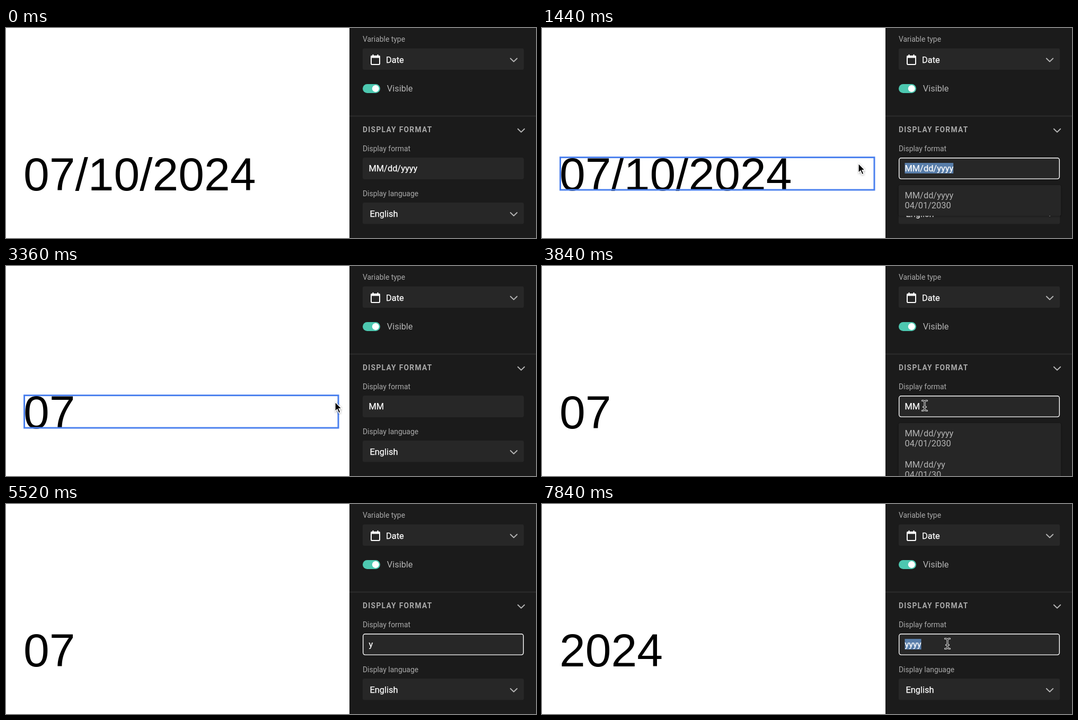
Write an HTML page that moves like this. It is 1000x397 px and loops after 8000 ms.

```html
<!DOCTYPE html>
<html lang="en">
<head>
<meta charset="utf-8">
<title>Date variable display format</title>
<style>
  html, body { margin: 0; width: 100%; height: 100%; overflow: hidden; background: #fff; }
  svg { display: block; width: 100vw; height: 100vh; }
  text { font: 16.4px Roboto, sans-serif; fill: #b4b4b4; white-space: pre; }
  .label { font-size: 13.9px; fill: #aaa; }
  .value { fill: #fff; stroke: #fff; stroke-width: .25; }
  .title { font-size: 13.8px; font-weight: 700; letter-spacing: 1.3px; fill: #a8a8a8; }
  .date { font: 87.6px "Liberation Sans", Arial, sans-serif; fill: #000; }
  .field { fill: #272727; }
  .chevron { fill: none; stroke: #b4b4b4; stroke-width: 1.9; stroke-linecap: round; stroke-linejoin: round; }
</style>
</head>
<body>
<svg viewBox="0 0 1000 397">
  <defs>
    <path id="chevron" class="chevron" d="M-6.2 -3 L0 3 L6.2 -3"/>
    <path id="bar" d="M-4.5 -9.5 Q-.5 -9.5 0 -7 Q.5 -9.5 4.5 -9.5 M0 -7 V7 M-4.5 9.5 Q-.5 9.5 0 7 Q.5 9.5 4.5 9.5 M-2.5 2.5 H2.5" fill="none" stroke-linecap="round"/>
    <filter id="shadow" x="-10%" y="-20%" width="120%" height="140%">
      <feDropShadow dx="0" dy="1" stdDeviation="2" flood-color="#000" flood-opacity=".4"/>
    </filter>
  </defs>

  <rect width="1000" height="397" fill="#fff"/>
  <text id="date" class="date" x="33" y="307.2"></text>
  <rect id="frame" x="34.5" y="244.6" width="592.5" height="61.4" fill="none" stroke="#4a80ee" stroke-width="3"/>

  <rect x="648" width="352" height="397" fill="#1b1b1b"/>
  <rect x="648" y="165.5" width="352" height="2" fill="#2d2d2d"/>

  <text class="label" x="673" y="26">Variable type</text>
  <rect class="field" x="673" y="38.5" width="304" height="40.5" rx="3"/>
  <g stroke="#fff" fill="none" stroke-width="2">
    <rect x="689" y="53" width="16" height="16" rx="1.8"/>
    <path d="M688.5 54.5 H705.5" stroke-width="4"/>
    <path d="M692.5 50 V54 M701.5 50 V54"/>
  </g>
  <text class="value" x="717" y="65.5">Date</text>
  <use href="#chevron" x="958" y="60.5"/>

  <rect x="673" y="106" width="33" height="17" rx="8.5" fill="#4dc8b0"/>
  <circle cx="697.3" cy="114.5" r="6.5" fill="#fff"/>
  <text x="718.8" y="120">Visible</text>

  <text class="title" x="673" y="197">DISPLAY FORMAT</text>
  <use href="#chevron" x="972" y="193.7"/>

  <text class="label" x="673" y="233">Display format</text>
  <rect class="field" x="673" y="245" width="304" height="41" rx="3.5"/>
  <rect id="focus" x="673.7" y="245.7" width="302.6" height="39.4" rx="4" fill="#272727" stroke="#fff" stroke-width="1.4"/>
  <rect id="selection" y="255" height="20" fill="#587da9"/>
  <text id="input" class="value" x="684.5" y="271"></text>

  <text class="label" x="673" y="318">Display language</text>
  <rect class="field" x="673" y="330" width="304" height="40.5" rx="3"/>
  <text class="value" x="686.5" y="357">English</text>
  <use href="#chevron" x="958" y="352"/>

  <g id="list">
    <rect id="popup" x="673" y="297" width="306" rx="3" fill="#272727" filter="url(#shadow)"/>
    <text x="684.5" y="322">MM/dd/yyyy</text>
    <text x="684.5" y="341">04/01/2030</text>
    <g id="more">
      <text x="684.5" y="381">MM/dd/yy</text>
      <text x="684.5" y="400">04/01/30</text>
    </g>
  </g>

  <g id="cursor">
    <path id="arrow" d="M0 0 V17.6 L4 13.8 L7 20.8 L10 19.5 L7 12.7 H12.4 Z" fill="#000" stroke="#fff" stroke-width="1.3" filter="url(#shadow)"/>
    <g id="beam">
      <use href="#bar" stroke="#e8e8e8" stroke-width="3.2"/>
      <use href="#bar" stroke="#111" stroke-width="1.2"/>
    </g>
  </g>
</svg>
<script>
const LOOP = 8000, STEP = 80, TEXT_X = 684.5;
const el = Object.fromEntries([...document.querySelectorAll('[id]')].map(e => [e.id, e]));

// [start time, value]
const inputText = [[0, 'MM/dd/yyyy'], [1760, ''], [2080, 'M'], [2240, 'MM'],
  [5200, ''], [5440, 'y'], [5680, 'yy'], [5840, 'yyy'], [6000, 'yyyy']];
const dateText = [[0, '07/10/2024'], [2640, '07'], [6160, '2024']];
const focused = [[0, false], [640, true], [2640, false], [3680, true]];
const listSize = [[0, 0], [880, 1], [1760, 2], [2640, 0], [3760, 2], [5440, 0]];
const cursorOn = [[0, false], [80, true], [1760, false], [2880, true], [5200, false], [7120, true]];

// [time, x, y]
const path = [[80, 852, 342], [560, 835, 265], [880, 835, 265], [1280, 597, 256],
  [2880, 597, 256], [3360, 621, 257], [3680, 722, 264], [4080, 722, 264],
  [4400, 746, 262], [5200, 746, 262], [7120, 759, 264], [7520, 765, 264]];

const at = (track, t) => track.filter(([start]) => start <= t).pop()[1];
const show = (node, on) => node.setAttribute('visibility', on ? 'inherit' : 'hidden');
const ease = u => u * u * (3 - 2 * u);

function cursorAt(t) {
  const next = path.findIndex(p => p[0] > t);
  if (next === 0) return path[0].slice(1);
  if (next < 0) return path[path.length - 1].slice(1);
  const [t0, x0, y0] = path[next - 1], [t1, x1, y1] = path[next];
  const u = ease((t - t0) / (t1 - t0));
  return [x0 + (x1 - x0) * u, y0 + (y1 - y0) * u];
}

function select(t, cursorX) {
  const end = TEXT_X + el.input.getComputedTextLength();
  let start = end;
  if (t >= 880 && t < 1760) start = Math.min(end, Math.max(TEXT_X, cursorX));
  if ((t >= 4800 && t < 5200) || t >= 7600) start = TEXT_X;
  el.selection.setAttribute('x', start);
  el.selection.setAttribute('width', end - start);
}

function draw(t) {
  const [x, y] = cursorAt(t);
  const size = at(listSize, t);
  const inField = x > 673 && x < 977 && y > 245 && y < 286;

  el.date.textContent = at(dateText, t);
  el.input.textContent = at(inputText, t);
  select(t, x);

  show(el.focus, at(focused, t));
  show(el.frame, x < 628 && t < 3680);
  show(el.list, size > 0);
  show(el.more, size > 1);
  el.popup.setAttribute('height', size > 1 ? 110 : 58);

  show(el.cursor, at(cursorOn, t));
  show(el.arrow, !inField);
  show(el.beam, inField);
  el.cursor.setAttribute('transform', `translate(${x} ${y})`);
}

const began = performance.now();
function tick() {
  const t = (performance.now() - began) % LOOP;
  draw(Math.floor(t / STEP) * STEP);
  requestAnimationFrame(tick);
}
tick();
</script>
</body>
</html>
```
